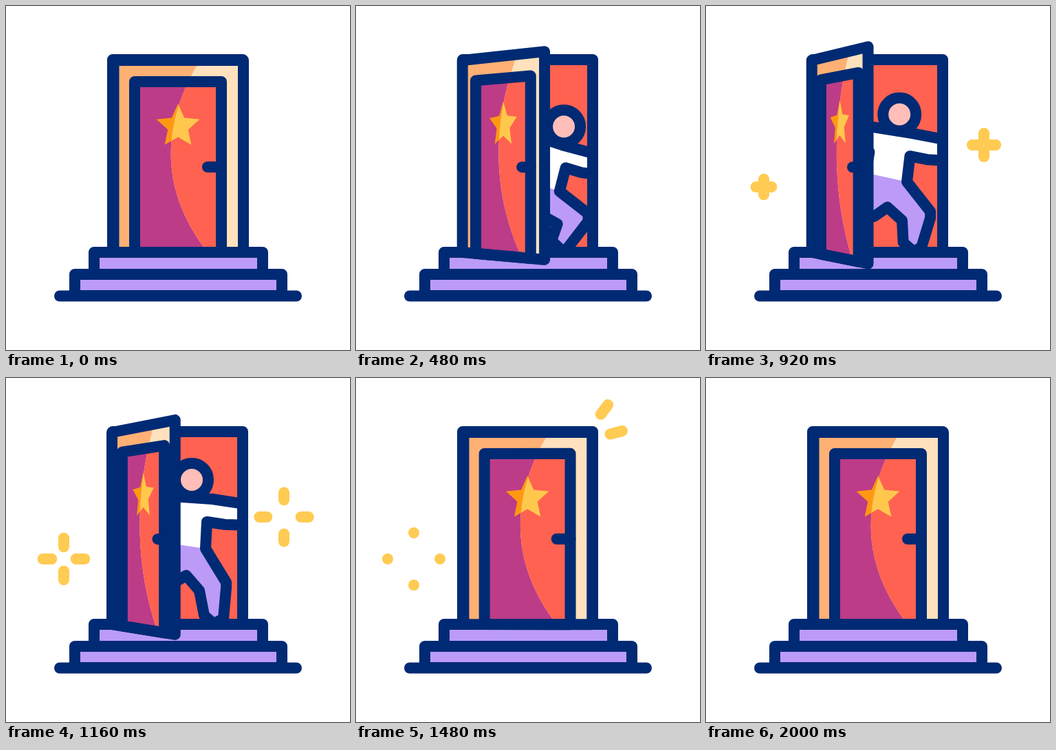
An HTML page for the animation above (2.4 s loop, 500 px wide and 500 px high).

```html
<!DOCTYPE html>
<html lang="en">
<head>
<meta charset="utf-8">
<title>Stage door</title>
<style>
  html, body { margin: 0; width: 100%; height: 100%; overflow: hidden; background: #fff; }
  svg { display: block; width: 100vw; height: 100vh; }
  .line { stroke: #002a74; stroke-width: 16; stroke-linecap: round; stroke-linejoin: round; }
  .spark { stroke: #ffcb52; stroke-width: 16; stroke-linecap: round; fill: none; }
</style>
</head>
<body>
<svg viewBox="0 0 500 500">
  <defs>
    <clipPath id="opening"><rect x="155" y="77" width="189" height="281"/></clipPath>
    <clipPath id="lit"><path id="litShape"/></clipPath>
  </defs>

  <rect x="155" y="78" width="189" height="280" fill="#ff6250"/>
  <g clip-path="url(#opening)">
    <path id="trousers" fill="#bb9bf7"/>
    <path id="shirt" fill="#fff"/>
    <path id="outline" class="line" fill="none"/>
    <path id="backArm" class="line" fill="none"/>
    <circle id="head" class="line" r="24" fill="#ffbeb8"/>
  </g>
  <rect class="line" x="155" y="78" width="189" height="280" fill="none"/>

  <g class="line" fill="#bb9bf7">
    <path d="M100 421V390H401V421Z"/>
    <path d="M128 390V358H373V390Z"/>
    <path d="M78 421.5H422"/>
  </g>

  <g id="door">
    <path class="slab" fill="#ffb074"/>
    <path class="panel" fill="#bc3c87"/>
    <path class="star" fill="#ff9811"/>
    <g clip-path="url(#lit)">
      <path class="slab" fill="#ffe1bd"/>
      <path class="panel" fill="#ff6250"/>
      <path class="star" fill="#ffc84d"/>
    </g>
    <path class="panel line" fill="none"/>
    <path class="handle line" fill="none"/>
    <path class="slab line" fill="none"/>
  </g>

  <path id="sparks" class="spark"/>
</svg>

<script>
const LOOP = 2400, STEP = 40;
const $ = id => document.getElementById(id);
const clamp = u => Math.min(1, Math.max(0, u));
const ease = u => { u = clamp(u); return u * u * (3 - 2 * u); };
const easeOut = u => 1 - (1 - clamp(u)) ** 2;
const mix = (a, b, u) => a + (b - a) * u;
const mixPoint = (a, b, u) => [mix(a[0], b[0], u), mix(a[1], b[1], u)];
const poly = (points, end = 'Z') => 'M' + points.map(p => p.map(v => v.toFixed(2))).join('L') + end;

// Eased value between [time, value] keys.
function track(keys, t) {
  const i = keys.findIndex(k => k[0] > t);
  if (i < 0) return keys[keys.length - 1][1];
  const [t0, a] = keys[i - 1], [t1, b] = keys[i];
  return mix(a, b, ease((t - t0) / (t1 - t0)));
}

const SWING = [[0, 0], [800, 1.1], [1095, 1.1], [1440, 0], [1720, 0.31], [2000, 0]];
const STAND = [[0, 0.5], [560, 0], [640, 0], [1100, 1], [1440, 1], [2000, 0.1]];

// Body outline from the back shoulder round the arm and legs.
const CROUCHED = [[215, 170], [256, 188], [300, 203], [352, 217], [352, 246], [328, 243],
  [305, 236], [296, 270], [338, 302], [338, 313], [308, 351], [301, 357], [284, 341],
  [293, 317], [267, 303], [245, 322], [215, 322]];
const UPRIGHT = [[215, 172], [256, 173], [300, 176], [352, 184], [352, 214], [318, 213],
  [292, 209], [290, 248], [320, 297], [320, 305], [316, 350], [302, 357], [288, 345],
  [281, 309], [262, 287], [245, 297], [215, 310]];

const SLAB = [[156.5, 79], [345, 79], [345, 358], [156.5, 358]];
const PANEL = [[187, 110], [313, 110], [313, 358], [187, 358]];
const HANDLE = [[293, 234], [313, 234]];
const STAR = Array.from({ length: 10 }, (_, i) => {
  const r = i % 2 ? 15.5 : 33, a = i * Math.PI / 5;
  return [250 + r * Math.sin(a), 175 - r * Math.cos(a)];
});
const SHADE = [[282, 79], [244, 140], [205, 245], [293, 358]];

function drawDoor(p) {
  const left = 156.5 - 2.5 * p, width = 188.5 - 97 * p;
  const turn = ([x, y]) => {
    const u = (x - 156.5) / 188.5;
    return [left + u * width, y + u * p * (-18 + 33 * (y - 79) / 279)];
  };
  const put = (name, points, end) => {
    const d = poly(points.map(turn), end);
    document.querySelectorAll('#door .' + name).forEach(el => el.setAttribute('d', d));
  };
  put('slab', SLAB);
  put('panel', PANEL);
  put('handle', HANDLE, '');
  put('star', STAR);
  const [a, b, c, e] = SHADE.map(turn);
  $('litShape').setAttribute('d', `M${a}C${b} ${c} ${e}L${turn([360, 370])}L${turn([360, 70])}Z`);
}

function drawMan(q) {
  const body = CROUCHED.map((p, i) => mixPoint(p, UPRIGHT[i], q));
  const waist = mixPoint([215, 242], [215, 237], q);
  const head = mixPoint([303, 176], [270, 148], q);
  const arm = [mixPoint([252, 220], [230, 208], q), mixPoint([246, 248], [225, 240], q)];
  $('trousers').setAttribute('d', poly(body));
  $('shirt').setAttribute('d', poly([...body.slice(0, 8), waist]));
  $('outline').setAttribute('d', poly(body));
  $('backArm').setAttribute('d', poly(arm, ''));
  $('head').setAttribute('cx', head[0]);
  $('head').setAttribute('cy', head[1]);
}

// Part of the line a-b between the fractions tail and head.
const streak = (a, b, tail, head) =>
  head > 0 && tail < 1 ? poly([mixPoint(a, b, tail), mixPoint(a, b, head)], '') : '';

function twinkle(x, y, start, t) {
  const head = ease((t - start) / 520), tail = ease((t - start - 150) / 520);
  return [[1, 0], [0, 1], [-1, 0], [0, -1]].map(([dx, dy]) =>
    streak([x + 8 * dx, y + 8 * dy], [x + 38 * dx, y + 38 * dy], tail, head)).join('');
}

function drawSparks(t) {
  const head = easeOut((t - 1400) / 240), tail = ease((t - 1440) / 320);
  $('sparks').setAttribute('d',
    twinkle(404, 202, 730, t) + twinkle(84, 263, 812, t) +
    streak([355, 54], [375, 27], tail, head) +
    streak([368, 82], [402, 73], tail, head));
}

function draw(t) {
  drawDoor(track(SWING, t));
  drawMan(track(STAND, t));
  drawSparks(t);
}

const begin = performance.now();
function tick() {
  const t = (performance.now() - begin) % LOOP;
  draw(Math.floor(t / STEP) * STEP);
  requestAnimationFrame(tick);
}
tick();
</script>
</body>
</html>
```
